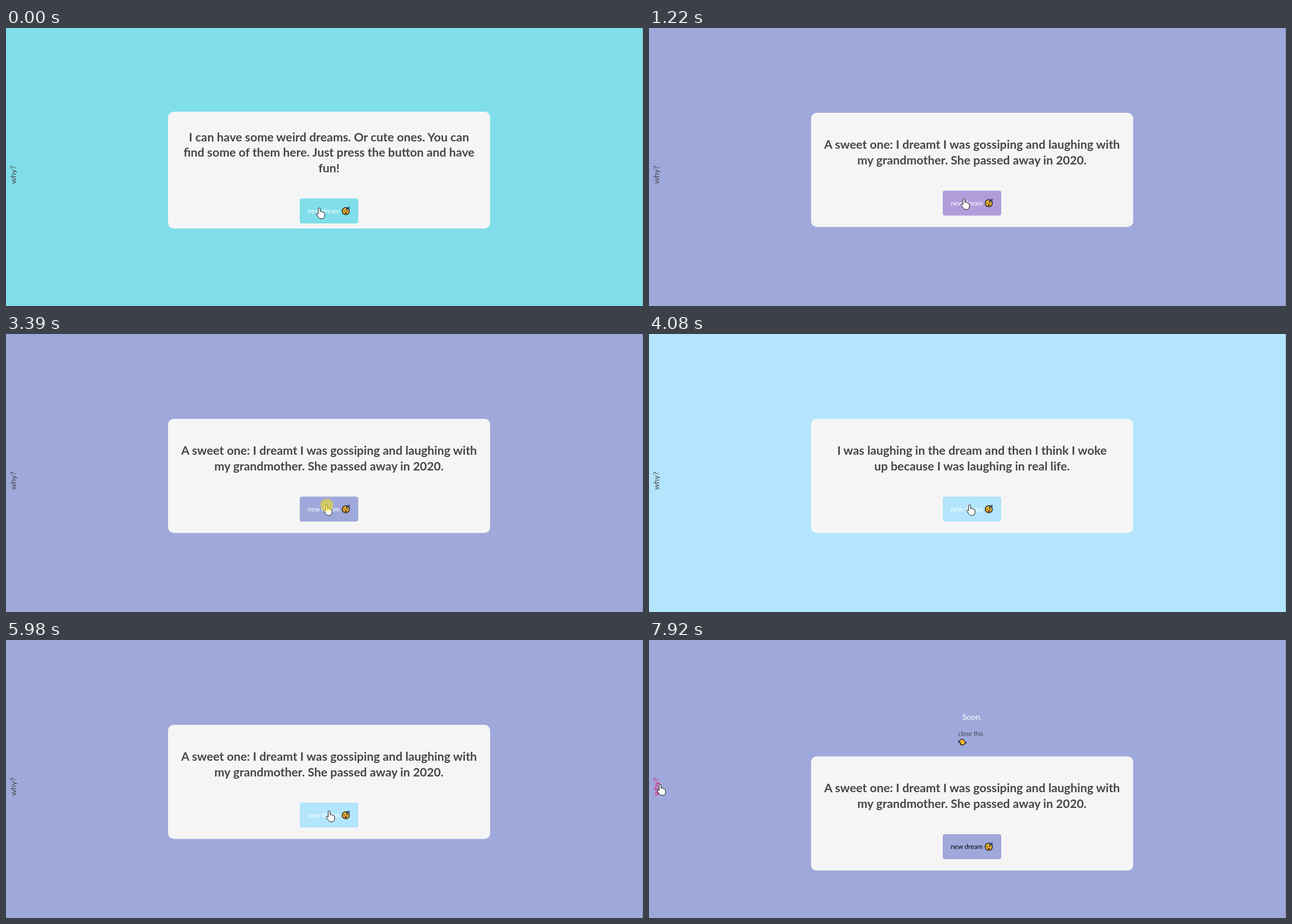
Animation, 1132 px wide and 495 px high, one loop 7.99 s. Source, as an HTML page:

```html
<!DOCTYPE html>
<html lang="en">
<head>
<meta charset="utf-8">
<title>Dreams</title>
<style>
  html, body { margin: 0; width: 100%; height: 100%; overflow: hidden; }
  svg { display: block; width: 100%; height: 100%; }
  text { font-family: Lato, "Open Sans", sans-serif; fill: #464549; }
  .head { font-size: 21.3px; font-weight: 700; text-anchor: middle; }
  .label { font-size: 11.8px; }
</style>
</head>
<body>
<svg viewBox="0 0 1132 495" xmlns="http://www.w3.org/2000/svg">
  <rect id="bg" width="1132" height="495"/>
  <rect x="1131" width="1" height="495" fill="#000" opacity=".18"/>
  <text id="why" transform="translate(18 277.5) rotate(-90)" font-size="14.1">why?</text>

  <g id="panel">
    <text x="574" y="142" font-size="14" text-anchor="middle" style="fill:#fff">Soon.</text>
    <text x="549.5" y="171" font-size="10.9">close this</text>
    <g transform="translate(557 182) rotate(-35)" stroke="#111" stroke-linecap="round">
      <path d="M-4-2Q-4-5-2.5-5Q-1.5-6 0-5.2Q1.5-6 2.4-4.8Q4-5 4-2V1Q4 5 0 5Q-3 5-5 1.5Q-5.6 0-4 .3Z" fill="#fcb832" stroke-width="1.2"/>
      <path d="M-5-5.5L-6-3.5M5.5 3.5L4.5 5.5" fill="none" stroke-width="1.2"/>
    </g>
  </g>

  <g id="box">
    <rect id="card" y="0" rx="10" fill="#f5f5f5"/>
    <g id="lines"></g>
    <g id="flushed" transform="translate(772 249)" stroke="#111">
      <circle r="11.8" fill="#fcc436" stroke-width="1.9"/>
      <g stroke="none" fill="#f0803c">
        <ellipse cx="-7.2" cy="3.6" rx="2.6" ry="1.9"/>
        <ellipse cx="7.2" cy="3.6" rx="2.6" ry="1.9"/>
      </g>
      <g fill="#fff" stroke-width=".8">
        <circle cx="-4.8" cy="-2" r="3.7"/>
        <circle cx="4.8" cy="-2" r="3.7"/>
      </g>
      <g stroke="none" fill="#111">
        <circle cx="-4.8" cy="-2" r="1.4"/>
        <circle cx="4.8" cy="-2" r="1.4"/>
      </g>
      <path d="M-2.6 5.9H2.6" stroke-width="1.9" stroke-linecap="round"/>
    </g>
    <g id="button">
      <rect id="face" x="522" y="0" width="104" height="44.5" rx="4"/>
      <text id="label" class="label" x="536" y="26.8">new dream</text>
      <g transform="translate(603.8 22.6)" fill="none" stroke="#111" stroke-linecap="round">
        <circle r="6.4" fill="#fcb832" stroke-width="1.3"/>
        <path d="M-4.3-.4Q-3 .8-1.7-.4M1.2-.4Q2.5.8 3.8-.4" stroke-width="1"/>
        <ellipse cy="3.3" rx="1.5" ry="1.2" fill="#7a3a16" stroke-width=".7"/>
        <path d="M.8-4.5H3L.8-2.4H3M3.8-7H6.6L3.8-4.3H6.6" stroke="#1c3f77" stroke-width="1.1"/>
      </g>
    </g>
  </g>

  <g id="cursor" stroke="#111" stroke-linejoin="round" fill="#fff">
    <path id="hand" d="M-2 1.2Q-2-.6-.3-.6Q1.4-.6 1.4 1.2V6Q3.8 4.9 4.5 6.8Q6.6 6 7.2 7.7Q9.3 7.2 9.3 9.4V13Q9.3 18.6 4 18.6H2.6Q0 18.6-1.8 15.8L-5.2 10.8Q-5.8 9.5-4.6 8.9Q-3.4 8.5-2 10.3Z" stroke-width="1"/>
    <path id="arrow" d="M0 0V15.5L3.6 12.2L6 17.8L8.4 16.8L6 11.3H11Z" stroke-width="1"/>
    <circle id="ring" r="11.3" stroke="none" fill="rgb(255,231,0)" fill-opacity=".5"/>
  </g>
</svg>
<script>
const LOOP = 7990;
const $ = id => document.getElementById(id);

const dreams = {
  intro: { color: [128, 222, 234], x: 288, top: 149, bottom: 357, button: 303.4, base: [201.5, 229, 256.5],
    lines: ["I can have some weird dreams. Or cute ones. You can",
            "find some of them here. Just press the button and have", "fun!"] },
  more: { color: [178, 157, 219], x: 450, top: 151, bottom: 354.3, button: 275.7, base: [229],
    lines: ["More dreams to come"] },
  sweet: { color: [159, 168, 218], x: 288, top: 151, bottom: 354.3, button: 289.4, base: [215, 242.5],
    lines: ["A sweet one: I dreamt I was gossiping and laughing with",
            "my grandmother. She passed away in 2020."] },
  laugh: { color: [179, 229, 252], x: 288, top: 151, bottom: 354.3, button: 289.4, base: [215, 242.5],
    lines: ["I was laughing in the dream and then I think I woke",
            "up because I was laughing in real life."] },
  cat: { color: [244, 143, 177], x: 288, top: 147.5, bottom: 358, button: 304.5, base: [199.5, 227, 257.5],
    lines: ["I was singing in the dream and then I think I was",
            "singing/talking in real life somehow because I woke up",
            "and my cat was up looking at me like this:"] }
};

// [time, dream]
const picks = [[-999, "intro"], [70, "more"], [1220, "sweet"], [1980, "more"], [2720, "sweet"],
  [3450, "laugh"], [4220, "cat"], [5170, "laugh"], [5980, "sweet"]];

// click marks: [from, to]
const clicks = [[1150, 1220], [1930, 1980], [2650, 2720], [3330, 3450],
  [4150, 4220], [5100, 5170], [5910, 5980], [7050, 7110]];

// pointer tip moves: [from, to, x, y]
const moves = [[730, 1100, 560, 304.5], [1655, 1790, 561, 315], [2455, 2640, 570, 304.5],
  [4600, 4860, 568.5, 318], [5170, 5420, 574.5, 305], [6200, 6550, 60, 262],
  [6740, 6870, 11, 259], [7919, 7920, 20, 258]];

const OPEN = 7110, LEAVE = 6265, REACH = 6800, SHIFT = 56.3;

const ease = p => { p = Math.min(1, Math.max(0, p)); return p * p * (3 - 2 * p); };
const mix = (a, b, p) => a + (b - a) * p;
const rgb = (a, b = a, p = 0) => `rgb(${a.map((v, i) => Math.round(mix(v, b[i], p)))})`;
const set = (el, attrs) => { for (const k in attrs) el.setAttribute(k, attrs[k]); };
const show = (id, on) => $(id).setAttribute("display", on ? "inline" : "none");

function pointer(t) {
  let x = 557, y = 321;
  for (const [from, to, nx, ny] of moves) {
    const p = ease((t - from) / (to - from));
    x = mix(x, nx, p);
    y = mix(y, ny, p);
  }
  return [x, y];
}

let shown = "";
function layout(name) {
  if (name === shown) return;
  shown = name;
  const d = dreams[name];
  set($("bg"), { fill: rgb(d.color) });
  set($("card"), { x: d.x, y: d.top, width: 2 * (574.2 - d.x), height: d.bottom - d.top });
  set($("button"), { transform: `translate(0 ${d.button})` });
  $("lines").innerHTML = d.lines.map((s, i) => {
    const x = name === "cat" && i === 2 ? 556 : 574;
    return `<text class="head" x="${x}" y="${d.base[i]}">${s}</text>`;
  }).join("");
  show("flushed", name === "cat");
}

function draw(t) {
  let i = picks.length - 1;
  while (picks[i][0] > t) i--;
  const [start, name] = picks[i];
  layout(name);

  // the button colour trails the page colour
  const old = dreams[picks[Math.max(0, i - 1)][1]].color;
  set($("face"), { fill: rgb(old, dreams[name].color, ease((t - start - 70) / 180)) });
  $("label").style.fill = rgb([255, 255, 255], [0, 0, 0], ease((t - LEAVE) / 250));

  const open = t >= OPEN;
  show("panel", open);
  set($("box"), { transform: `translate(0 ${open ? SHIFT : 0})` });

  const onWhy = t >= REACH;
  $("why").style.fill = onWhy ? "#f0146a" : "#464549";

  const away = t >= LEAVE && !onWhy;
  const [x, y] = pointer(t);
  set($("cursor"), { transform: `translate(${x.toFixed(2)} ${y.toFixed(2)})` });
  show("hand", !away);
  show("arrow", away);
  show("ring", clicks.some(([a, b]) => t >= a && t < b));
}

const begin = performance.now();
function tick() {
  draw((performance.now() - begin) % LOOP);
  requestAnimationFrame(tick);
}
tick();
</script>
</body>
</html>
```
